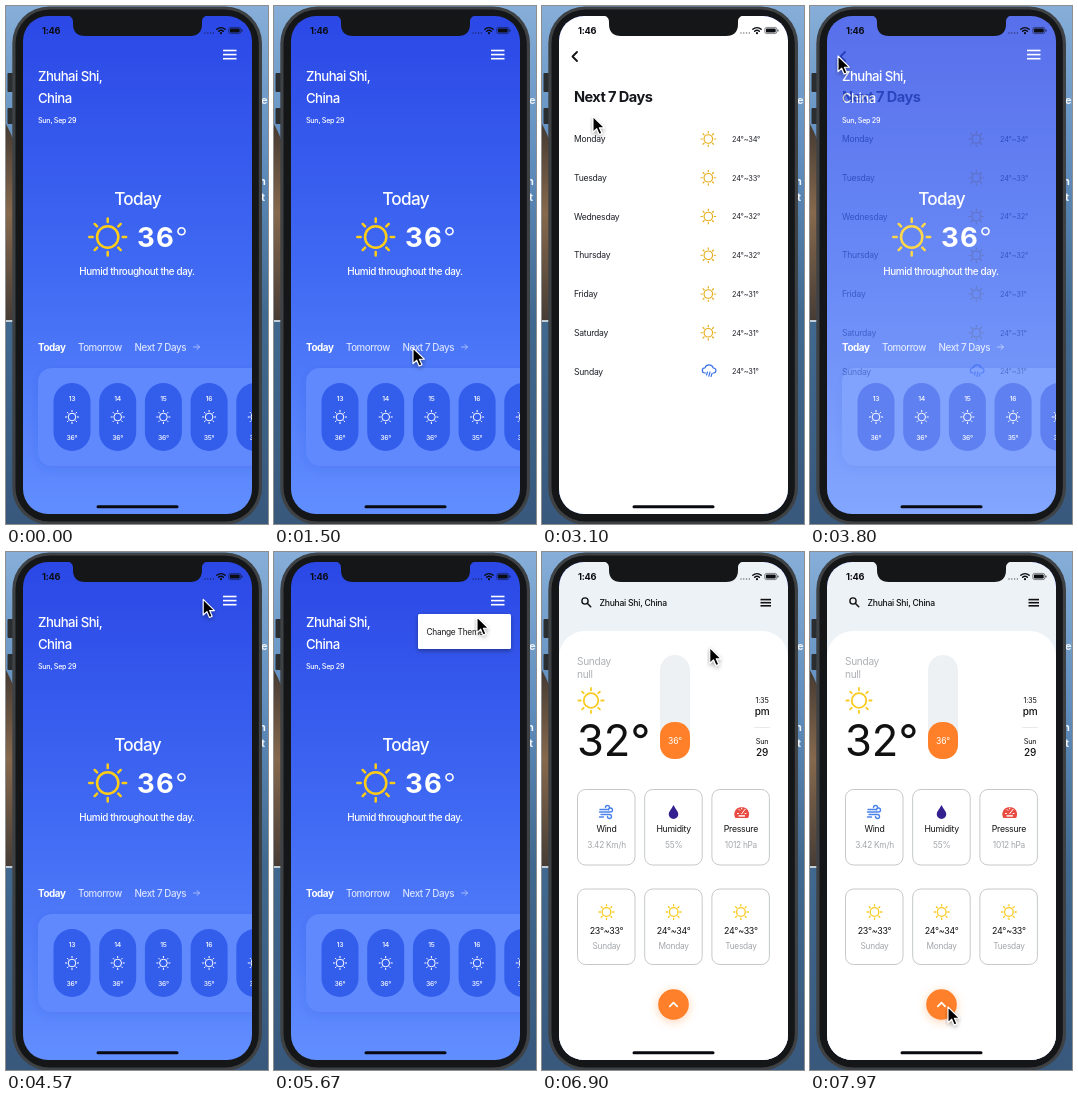
An HTML page that plays this animation: 262 by 518 pixels, repeating every 8000 ms.

```html
<!DOCTYPE html>
<html lang="en">
<head>
<meta charset="utf-8">
<title>Weather app</title>
<style>
  html, body { margin: 0; width: 100%; height: 100%; overflow: hidden; background: #35669a; }
  svg { display: block; width: 100vw; height: 100vh; }
  text { font-family: Inter, Roboto, sans-serif; letter-spacing: -.03em; white-space: pre; }
  #home { font-weight: 500; }
  #home text { letter-spacing: -.042em; }
</style>
</head>
<body>
<svg id="stage" viewBox="0 0 262 518"></svg>
<script>
const LOOP = 8000;

// Markup helpers
const text = (x, y, size, str, fill = '#fff', extra = '') =>
  `<text x="${x}" y="${y}" font-size="${size}" fill="${fill}" ${extra}>${str}</text>`;
const mid = (x, y, size, str, fill, extra = '') =>
  text(x, y, size, str, fill, `text-anchor="middle" ${extra}`);
const rect = (x, y, w, h, fill, r = 0, extra = '') =>
  `<rect x="${x}" y="${y}" width="${w}" height="${h}" rx="${r}" fill="${fill}" ${extra}/>`;
const line = (d, color, w = 1, extra = '') =>
  `<path d="${d}" fill="none" stroke="${color}" stroke-width="${w}" stroke-linecap="round" stroke-linejoin="round" ${extra}/>`;
const group = (id, body, extra = '') => `<g id="${id}" ${extra}>${body}</g>`;
const WEIGHT = w => `font-weight="${w}"`;

function sun(cx, cy, r, color, w) {
  let d = '';
  for (let i = 0; i < 8; i++) {
    const a = i * Math.PI / 4, c = Math.cos(a), s = Math.sin(a);
    d += `M${cx + c * r * .79} ${cy + s * r * .79}L${cx + c * r * .97} ${cy + s * r * .97}`;
  }
  return `<circle cx="${cx}" cy="${cy}" r="${r * .56}" fill="none" stroke="${color}" stroke-width="${w}"/>` + line(d, color, w);
}

const menu = (x, y, w, gap, color) =>
  [0, 1, 2].map(i => rect(x, y + i * gap, w, 1.6, color)).join('');

function backdrop() {
  return rect(0, 0, 262, 518, 'url(#sky)') +
    '<path d="M0 118L4 126 10 140V316H0Z" fill="url(#rock)"/>' +
    rect(0, 314, 10, 2, '#c3cdd6') +
    rect(1.5, 67, 8, 19, '#2b2e31', 1) + rect(1.5, 102, 8, 16, '#2b2e31', 1) +
    text(255, 98, 11, 'el', '#eef3f8', WEIGHT(700)) +
    text(253, 179, 11, 'n', '#eef3f8', WEIGHT(700)) +
    text(255, 195, 11, 't', '#eef3f8', WEIGHT(700)) +
    rect(6.3, .5, 249.7, 518, '#3f4245', 37) +
    rect(9.5, 3.5, 243.3, 512, '#141618', 34);
}

function home() {
  const hours = [[13, 36], [14, 36], [15, 36], [16, 35], [17, 35]];
  const chips = hours.map(([hour, temp], i) => {
    const x = 66 + i * 45.7;
    return rect(x - 18.5, 377, 37, 68, '#335eec', 18.5) +
      mid(x, 394.5, 6.8, hour, '#fff') + sun(x, 411, 6.8, '#fff', 1) +
      mid(x, 433.5, 6.8, temp + '°', '#fff');
  }).join('');
  return rect(17, 10, 229, 498, 'url(#blue)') +
    menu(217, 43.7, 13.5, 4.1, '#fff') +
    text(32, 75, 13.2, 'Zhuhai Shi,') + text(32, 96.5, 13.2, 'China') +
    text(32, 117, 7.2, 'Sun, Sep 29') +
    mid(131.5, 199, 17.2, 'Today', '#fff') +
    sun(101.7, 231, 19, '#ffcd17', 2.5) +
    text(131, 241, 27.5, '36<tspan font-weight="300">°</tspan>', '#fff', 'font-weight="700" style="letter-spacing:1.3px"') +
    mid(131, 269, 9.9, 'Humid throughout the day.', '#fff') +
    text(32, 344.5, 9.9, 'Today', '#fff', WEIGHT(700)) +
    text(72, 344.5, 9.7, 'Tomorrow', '#d9e2ff') + text(128.5, 344.5, 9.8, 'Next 7 Days', '#d9e2ff') +
    line('M187.5 341H193.5M191 338.5L193.5 341 191 343.5', '#bccbff', .8) +
    rect(32, 362, 240, 98, '#5f89fd', 14, 'filter="url(#soft)"') + chips;
}

function week() {
  const days = ['Monday', 'Tuesday', 'Wednesday', 'Thursday', 'Friday', 'Saturday', 'Sunday'];
  const highs = [34, 33, 32, 32, 31, 31, 31];
  const rows = days.map((day, i) => {
    const y = 133 + i * 38.75;
    const icon = i < 6 ? sun(166.3, y, 7.6, '#e6ae1c', 1.2)
      : line(`M163.5 ${y + 1.5}h-.7a2.6 2.6 0 0 1 .2-5.2a4.3 4.3 0 0 1 8.2 .2a2.5 2.5 0 0 1 .4 5h-.6M165.5 ${y + .5}l-1 3M168 ${y + .5}l-1.2 4.2M170 ${y + 2}l-1 3`, '#3d74e8', 1.2);
    return text(32, y + 3, 8.6, day, '#1c1f26') + icon +
      text(190, y + 2.8, 7.4, `24°~${highs[i]}°`, '#1c1f26');
  }).join('');
  return rect(17, 10, 229, 498, '#fff') +
    line('M35 46L30.5 50.5 35 55', '#111', 1.8) +
    text(32, 96, 14.6, 'Next 7 Days', '#14161c', 'font-weight="700" style="letter-spacing:-.04em"') + rows;
}

function light() {
  const ink = '#111', gray = '#a3a6aa', gold = '#f9cb22', orange = '#ff8029';
  const stats = [['Wind', '3.42 Km/h'], ['Humidity', '55%'], ['Pressure', '1012 hPa']];
  const days = [['23°~33°', 'Sunday'], ['24°~34°', 'Monday'], ['24°~33°', 'Tuesday']];
  const cards = [0, 1, 2].map(i => {
    const x = 35.5 + i * 67.2, cx = x + 29;
    const frame = y => rect(x, y, 57.5, 75.5, 'none', 8, 'stroke="#bfc2c6" stroke-width=".9"');
    return frame(237.5) + mid(cx, 280, 8.7, stats[i][0], ink) + mid(cx, 295.5, 8.3, stats[i][1], gray) +
      frame(337) + sun(cx, 360, 7.7, gold, 1.3) + mid(cx, 381.5, 8.9, days[i][0], ink) + mid(cx, 397, 8.3, days[i][1], gray);
  }).join('');
  const icons =
    line('M58 257.5h7.5a2 2 0 1 0-2-2M57.5 260h11a2 2 0 1 0-2-2M59 262.5h8.5a2 2 0 1 1-2 2M57.5 265h4', '#4c83ea', 1.4) +
    '<path d="M131.5 253C133.5 257 136.3 259.5 136.3 262.2A4.8 4.8 0 0 1 126.7 262.2C126.7 259.5 129.5 257 131.5 253Z" fill="#35208f"/>' +
    '<path d="M193.3 266A7.4 7.4 0 1 1 206.1 266Z" fill="#e84b41"/>' +
    line('M195.5 261.5h1M197 257.5l.8.8M199.7 256v1M203.2 257.2l-3.5 4.5M203 261.5h1', '#fff', 1) +
    rect(196.5, 263.2, 6.5, 1.4, '#fff');
  return rect(17, 10, 229, 498, '#edf2f6') + rect(17, 79, 229, 460, '#fff', 26) +
    `<circle cx="43" cy="49" r="3.1" fill="none" stroke="${ink}" stroke-width="1.4"/>` + line('M45.5 51.5L48.7 54.7', ink, 1.5) +
    text(57.5, 54, 8.6, 'Zhuhai Shi, China', ink, WEIGHT(500)) + menu(218.5, 46.8, 10.5, 3.1, ink) +
    text(35, 113, 10.1, 'Sunday', '#aeb1b5') + text(35, 125.5, 10.1, 'null', '#aeb1b5') +
    sun(49, 148.5, 13, gold, 1.8) +
    text(35, 204, 43.5, '32°', ink, 'font-weight="400" style="letter-spacing:0"') +
    rect(118, 103, 30, 104, '#edf1f4', 15) + rect(118, 170, 30, 37, orange, 14) + mid(133, 191.5, 8.6, '36°', '#fff') +
    mid(220, 151, 7.4, '1:35', ink) + mid(220, 163, 10, 'pm', ink, WEIGHT(500)) +
    rect(212, 175, 16, .8, '#e2e4e6') +
    mid(220, 192, 7.3, 'Sun', ink) + mid(220, 204, 10, '29', ink, WEIGHT(500)) +
    cards + icons +
    `<circle cx="131.5" cy="452.5" r="15.3" fill="${orange}" filter="url(#glow)"/>` +
    line('M127.8 454.3L131.5 450.6 135.2 454.3', '#fff', 1.7);
}

function statusBar() {
  const ink = '#0b0d12';
  const dots = [0, 1, 2, 3].map(i => `<circle cx="${199 + i * 2.8}" cy="27" r=".7" fill="${ink}" opacity=".6"/>`).join('');
  return text(36, 28, 9.2, '1:46', ink, WEIGHT(700)) + dots +
    line('M210.8 23.3a6 6 0 0 1 8.4 0M212.6 25.3a3.5 3.5 0 0 1 4.8 0', ink, 1.4) +
    `<circle cx="215" cy="27.2" r="1.1" fill="${ink}"/>` +
    rect(222.8, 21.4, 12, 6.2, 'none', 1.8, `stroke="${ink}" stroke-width=".7" opacity=".7"`) +
    rect(223.9, 22.5, 9.8, 4, ink, .9) + rect(235.5, 23.4, .9, 2.2, ink, .4) +
    rect(90.5, 499.2, 82, 3, '#080a10', 1.5);
}

const defs = `<defs>
  <linearGradient id="blue" x2="0" y2="1"><stop stop-color="#2b48e6"/><stop offset=".5" stop-color="#3f69f3"/><stop offset="1" stop-color="#618eff"/></linearGradient>
  <linearGradient id="sky" x2="0" y2="1"><stop stop-color="#86aed8"/><stop offset=".3" stop-color="#5f8dbd"/><stop offset=".6" stop-color="#41698f"/><stop offset="1" stop-color="#38587c"/></linearGradient>
  <linearGradient id="rock" x2="0" y2="1"><stop stop-color="#453a32"/><stop offset=".45" stop-color="#86694d"/><stop offset="1" stop-color="#463c35"/></linearGradient>
  <filter id="soft" x="-10%" y="-10%" width="120%" height="130%"><feDropShadow dx="0" dy="3" stdDeviation="4" flood-color="#2747c8" flood-opacity=".15"/></filter>
  <filter id="glow" x="-60%" y="-60%" width="220%" height="220%"><feDropShadow dx="0" dy="2" stdDeviation="5" flood-color="#ff8029" flood-opacity=".35"/></filter>
  <filter id="shade" x="-20%" y="-20%" width="140%" height="160%"><feDropShadow dx="0" dy="2" stdDeviation="2" flood-opacity=".35"/></filter>
  <clipPath id="screen"><rect x="17" y="10" width="229" height="498" rx="25"/></clipPath>
</defs>`;

const stage = document.getElementById('stage');
stage.innerHTML = defs + backdrop() +
  group('pages',
    group('home', home()) + group('week', week()) +
    group('light', light() + rect(17, 10, 229, 498, '#000', 0, 'id="dim"')) +
    group('popup', rect(144, 62, 93, 35, '#fff', 1.5, 'id="sheet" filter="url(#shade)"') +
      text(152.5, 82.5, 8.3, 'Change Theme', '#16181c', 'id="label"')) +
    statusBar(), 'clip-path="url(#screen)"') +
  '<path d="M60 9C65 10 67 12 67 16V18Q67 30 79 30H184Q196 30 196 18V16C196 12 198 10 203 9Z" fill="#141618"/>' +
  group('cursor', '<path d="M0 0V15.6L3.7 12.2 6.2 18 8.9 16.8 6.4 11.2H11.3Z" fill="#000" stroke="#fff" stroke-width="1.1" stroke-linejoin="round" filter="url(#shade)"/>');

const el = Object.fromEntries(
  ['week', 'light', 'dim', 'popup', 'sheet', 'label', 'cursor'].map(id => [id, document.getElementById(id)]));

// Motion helpers
const ramp = (t, start, length) => Math.min(1, Math.max(0, (t - start) / length));
const easeOut = p => 1 - (1 - p) ** 2;
const smooth = p => p * p * (3 - 2 * p);
const fade = (node, value) => {
  node.setAttribute('opacity', value);
  node.style.display = value > 0 ? '' : 'none';
};

// Pointer stops: time, x, y
const stops = [
  [600, 225, 522], [1300, 139, 342], [2500, 139, 342], [3350, 28, 50], [3950, 28, 50],
  [4750, 222, 47], [5250, 222, 47], [5650, 203, 65], [5750, 203, 65], [6250, 169, 81],
  [6800, 169, 81], [7650, 138, 455], [LOOP, 138, 455]
];

function pointer(t) {
  const i = stops.findIndex(s => s[0] > t);
  if (i < 1) return stops[0].slice(1);
  const [t0, x0, y0] = stops[i - 1], [t1, x1, y1] = stops[i];
  const p = smooth((t - t0) / (t1 - t0));
  return [x0 + (x1 - x0) * p, y0 + (y1 - y0) * p];
}

function draw(t) {
  fade(el.week, easeOut(ramp(t, 1710, 300)) - easeOut(ramp(t, 3640, 300)));
  fade(el.light, easeOut(ramp(t, 6400, 300)));
  fade(el.dim, .5 * (1 - ramp(t, 6400, 500)));

  const open = easeOut(ramp(t, 4970, 280));
  fade(el.popup, ramp(t, 4970, 100) * (1 - ramp(t, 6560, 140)));
  el.sheet.setAttribute('x', 237 - 93 * open);
  el.sheet.setAttribute('width', 93 * open);
  el.sheet.setAttribute('height', 35 * open);
  fade(el.label, ramp(t, 5100, 150) * (1 - ramp(t, 6510, 130)));

  const [x, y] = pointer(t);
  fade(el.cursor, t < stops[0][0] ? 0 : 1);
  el.cursor.setAttribute('transform', `translate(${x} ${y})`);
}

const begin = performance.now();
function tick() {
  draw((performance.now() - begin) % LOOP);
  requestAnimationFrame(tick);
}
tick();
</script>
</body>
</html>
```
